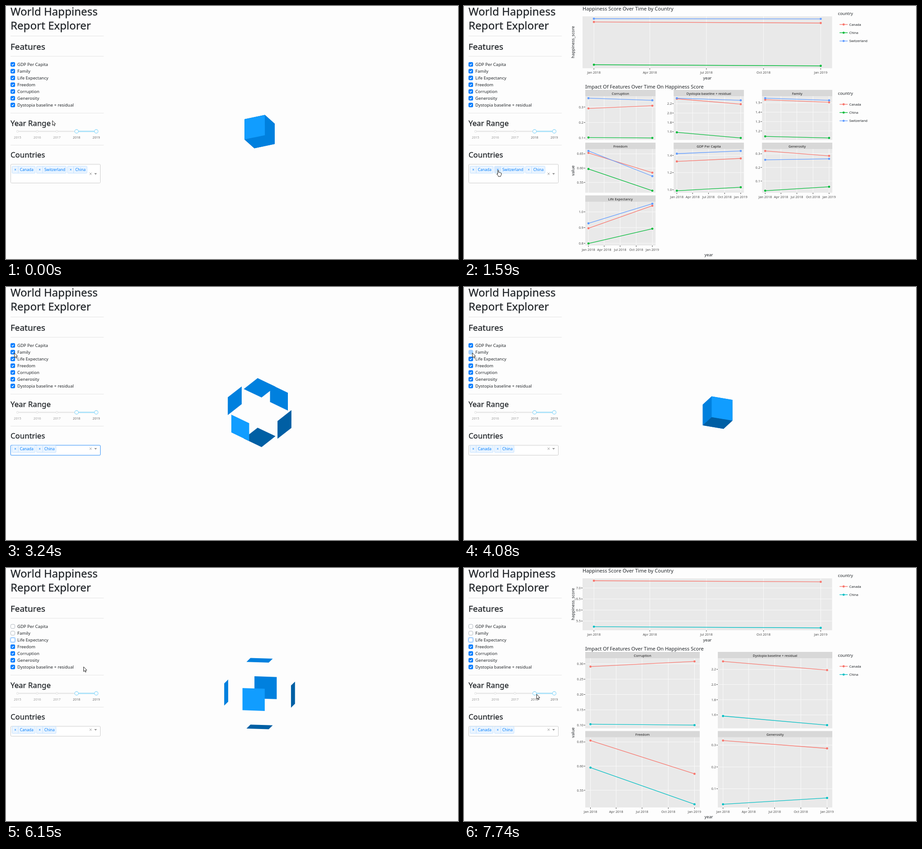
These frames come from a looping animation (999x561 px, 7990 ms). An HTML page with a canvas:

```html
<!DOCTYPE html>
<html lang="en">
<head>
<meta charset="utf-8">
<title>World Happiness Report Explorer</title>
<style>
html, body { margin: 0; width: 100%; height: 100%; overflow: hidden; background: #fdfdfd; }
canvas { display: block; width: 999px; height: 561px; }
</style>
</head>
<body>
<canvas id="stage" width="999" height="561"></canvas>
<script>
const ctx = document.getElementById('stage').getContext('2d');
const LOOP = 7990;
const FONT = '"Noto Sans", "Open Sans", sans-serif';
const BLUE = '#007bff', INK = '#212529', BG = '#fdfdfd';

const BEATS = [[0, 0], [1, 150], [8, 1050], [10, 1290], [17, 2280], [18, 2430], [24, 3240],
  [25, 3360], [26, 3510], [30, 4080], [33, 4500], [34, 4620], [41, 5550], [42, 5670],
  [46, 6150], [49, 6600], [50, 6720], [58, 7740]];
const times = [0];
for (let i = 1; i < BEATS.length; i++) {
  const [s0, t0] = BEATS[i - 1], [s1, t1] = BEATS[i];
  for (let s = s0 + 1; s <= s1; s++) times.push(Math.floor(t0 + (t1 - t0) * (s - s0) / (s1 - s0)));
}
const hold = t => times.filter(s => s <= t).pop();

const clamp = v => Math.max(0, Math.min(1, v));

// ---------- drawing helpers ----------
function text(str, x, y, size, { color = INK, align = 'left', weight = 400, bold = 0 } = {}) {
  ctx.font = `${weight} ${size}px ${FONT}`;
  ctx.textAlign = align;
  ctx.fillStyle = ctx.strokeStyle = color;
  ctx.fillText(str, x, y);
  if (bold) { ctx.lineWidth = bold; ctx.strokeText(str, x, y); }
}

function vtext(str, x, y, size) {
  ctx.save();
  ctx.translate(x, y);
  ctx.rotate(-Math.PI / 2);
  text(str, 0, 0, size, { align: 'center' });
  ctx.restore();
}

function rect(x, y, w, h, fill) {
  ctx.fillStyle = fill;
  ctx.fillRect(x, y, w, h);
}

function line(points, color, width = 1) {
  ctx.beginPath();
  points.forEach(([x, y]) => ctx.lineTo(x, y));
  ctx.strokeStyle = color;
  ctx.lineWidth = width;
  ctx.stroke();
}

function paint(fill, stroke, width = 1) {
  if (fill) { ctx.fillStyle = fill; ctx.fill(); }
  if (stroke) { ctx.strokeStyle = stroke; ctx.lineWidth = width; ctx.stroke(); }
}

function box(x, y, w, h, r, fill, stroke, width) {
  ctx.beginPath();
  ctx.roundRect(x, y, w, h, r);
  paint(fill, stroke, width);
}

function dot(x, y, r, fill, stroke, width) {
  ctx.beginPath();
  ctx.arc(x, y, r, 0, 7);
  paint(fill, stroke, width);
}

function poly(points, fill, stroke, width) {
  ctx.beginPath();
  points.forEach(([x, y]) => ctx.lineTo(x, y));
  ctx.closePath();
  paint(fill, stroke, width);
}

// ---------- sidebar ----------
const LABELS = ['GDP Per Capita', 'Family', 'Life Expectancy', 'Freedom', 'Corruption',
  'Generosity', 'Dystopia baseline + residual'];
const CLICKS = { 'Family': 4012, 'GDP Per Capita': 4800, 'Life Expectancy': 5300 };
const DROP = 2200, BLUR = 3950;

function checkbox(label, i, t) {
  const y = 124.5 + i * 15, off = t - CLICKS[label];
  const later = Object.values(CLICKS).some(c => c > CLICKS[label] && c <= t);
  if (off >= 0) {
    const focus = !later && off > 150;
    if (focus) box(8.5, y - 1.5, 13, 13, 4, '#bfdeff');
    const fresh = off < 150;
    box(10.5, y + .5, 9, 9, 2.5, fresh ? '#a5d2ff' : '#fff',
      fresh ? '#8fc5fb' : focus ? '#80bdff' : '#adb5bd', 1);
  } else {
    box(10, y, 10, 10, 2.5, BLUE);
    line([[12.7, y + 5.1], [14.3, y + 6.7], [17.4, y + 3.5]], '#fff', 1.4);
  }
  text(label, 25, y + 8.5, 9.5);
}

function slider() {
  const years = [25.5, 69, 112.5, 156, 199.5];
  rect(25, 276.7, 175, 2.6, '#e7e7e7');
  rect(156, 276.7, 43.5, 2.6, '#a6e1fa');
  years.forEach((x, i) => {
    const on = i > 2;
    if (on) dot(x, 278, 4, '#fff', '#96dbfa', 1.4);
    else dot(x, 278, 2.1, '#fff', '#e4e4e4', 1.1);
    text(2015 + i, x, 293.5, 7.2, { align: 'center', color: on ? '#666' : '#999' });
  });
}

function dropdown(t) {
  const short = t >= DROP, focus = short && t < BLUR;
  const mid = short ? 359 : 363, h = short ? 22 : 41.5;
  const tags = [['Canada', 51], ['Switzerland', 65.5], ['China', 43]].filter(([n]) => !short || n !== 'Switzerland');
  if (focus) box(9, 349.8, 200.5, h + 2.4, 3, '#d4e8ff');
  box(10.5, 351, 198, h, 2, '#fff', focus ? '#3f97f6' : '#ccc', 1);
  let x = 13.5;
  tags.forEach(([name, w], i) => {
    box(x, mid - 7.8, w, 15.6, 1.5, '#ebf5ff', '#c2e0ff', 1);
    if (i === 1 && t >= 1170 && t < 2430) rect(x + .5, mid - 7.3, 13, 14.6, '#d8eafd');
    line([[x + 13.5, mid - 7.8], [x + 13.5, mid + 7.8]], '#c2e0ff');
    text('×', x + 7, mid + 3, 8, { align: 'center', color: '#007eff' });
    text(name, x + 17.2, mid + 3.2, 8.5, { color: '#007eff' });
    x += w + 3;
  });
  if (focus && (t - 2250) % 1060 < 530) line([[114.5, 352.5], [114.5, 365.5]], '#222');
  const cy = short ? 358.5 : 372;
  line([[184.7, cy - 2.4], [189.3, cy + 2.4]], '#999');
  line([[184.7, cy + 2.4], [189.3, cy - 2.4]], '#999');
  poly([[195, cy - 1.3], [201, cy - 1.3], [198, cy + 1.9]], '#888');
}

function sidebar(t) {
  const head = (str, y, size) => text(str, 10, y, size, { weight: 500, bold: .3 });
  head('World Happiness', 21, 24.1);
  head('Report Explorer', 51.5, 24.1);
  head('Features', 97, 18.9);
  head('Year Range', 265.5, 16.8);
  head('Countries', 336, 16.8);
  [66, 111, 237, 308].forEach(y => rect(10, y, 206, 1, '#e4e4e4'));
  LABELS.forEach((label, i) => checkbox(label, i, t));
  slider();
  dropdown(t);
}

// ---------- loading cube ----------
// [start, degrees per ms, end]
const RUNS = [[-620.4, .3317, 51], [51, .3317, 1400], [2255, .327, 3600], [4010, .3317, 6850]];
const MID = '#0080de', DARK = '#005fa4';
// normal, two edge directions, colour
const FACES = [
  [[0, 0, 1], [1, 0, 0], [0, 1, 0], '#119dff'],
  [[0, 0, -1], [1, 0, 0], [0, 1, 0], MID],
  [[-1, 0, 0], [0, 0, 1], [0, 1, 0], MID],
  [[1, 0, 0], [0, 0, 1], [0, 1, 0], DARK],
  [[0, -1, 0], [1, 0, 0], [0, 0, 1], MID],
  [[0, 1, 0], [1, 0, 0], [0, 0, 1], DARK]
];

function cube(deg) {
  const a = deg * Math.PI / 180, c = Math.cos(a), s = Math.sin(a);
  const gap = 25 + 50 * clamp((deg - 240) / 92);
  const turn = ([x, y, z]) => {
    const u = x * c + z * s, w = z * c - x * s;
    return [u, y * c - w * s, y * s + w * c];
  };
  FACES.map(([n, p, q, color]) => ({ n: turn(n), p: turn(p), q: turn(q), color }))
    .sort((f, g) => f.n[2] - g.n[2])
    .forEach(({ n, p, q, color }) => {
      const at = (i, j) => [0, 1].map(k => [560.5, 278.5][k] + n[k] * gap + 25 * (p[k] * i + q[k] * j));
      poly([at(-1, -1), at(1, -1), at(1, 1), at(-1, 1)], color);
    });
}

// ---------- charts ----------
// each series: 2018 and 2019 values for Canada, China, Switzerland
const SCORE = [[7.328, 7.278], [5.246, 5.191], [7.487, 7.48]];
const DATA = {
  'Corruption': [[.291, .308], [.103, .1], [.357, .343]],
  'Dystopia baseline + residual': [[2.305, 2.19], [1.585, 1.465], [2.318, 2.272]],
  'Family': [[1.532, 1.505], [1.142, 1.125], [1.549, 1.526]],
  'Freedom': [[.653, .584], [.597, .521], [.66, .572]],
  'GDP Per Capita': [[1.33, 1.365], [.989, 1.029], [1.42, 1.452]],
  'Generosity': [[.321, .285], [.029, .058], [.256, .263]],
  'Life Expectancy': [[.896, 1.039], [.799, .893], [.927, 1.052]]
};
const NAMES = ['Canada', 'China', 'Switzerland'];
const HUES = { 2: ['#f8766d', '#00bfc4'], 3: ['#f8766d', '#00ba38', '#619cff'] };
const QUARTERS = [['Jan 2018', 0], ['Apr 2018', .2466], ['Jul 2018', .4959], ['Oct 2018', .7479], ['Jan 2019', 1]];
const TICK = '#4d4d4d', PAD = .0455;

function plot(x, y, w, h, series, hues, axis) {
  const all = series.flat(), lo = Math.min(...all), span = Math.max(...all) - lo;
  const px = f => x + w * (PAD + (1 - 2 * PAD) * f);
  const py = v => y + h * (1 - PAD - (1 - 2 * PAD) * (v - lo) / span);
  const step = [.02, .05, .1, .2, .5].find(s => span / s <= 4.3);
  rect(x, y, w, h, '#e9e9e9');
  for (let k = Math.ceil((lo - span * .05) / step); k * step < lo + span * 1.05; k++) {
    const ty = py(k * step);
    line([[x, ty], [x + w, ty]], '#fafafa');
    line([[x - 3, ty], [x, ty]], '#444');
    text((k * step).toFixed(step < .1 ? 2 : 1), x - 4, ty + 2.7, 7.3, { align: 'right', color: TICK });
  }
  QUARTERS.forEach(([label, f]) => {
    line([[px(f), y], [px(f), y + h]], '#fafafa');
    if (!axis) return;
    line([[px(f), y + h], [px(f), y + h + 3]], '#444');
    text(label, px(f), y + h + 12, 7.4, { align: 'center', color: TICK });
  });
  series.forEach((pair, i) => {
    const pts = pair.map((v, j) => [px(j), py(v)]);
    line(pts, hues[i], 1.3);
    pts.forEach(p => dot(...p, 2.4, hues[i]));
  });
}

function legend(y, hues) {
  text('country', 826.5, y + 3, 9.2);
  hues.forEach((hue, i) => {
    const ly = y + 24.5 + 18.3 * i;
    line([[830, ly], [848, ly]], hue, 1.3);
    dot(839, ly, 2.4, hue);
    text(NAMES[i], 851.5, ly + 2.7, 7.4);
  });
}

function charts(count, features) {
  const hues = HUES[count];
  text('Happiness Score Over Time by Country', 262, 10, 11);
  plot(262, 23, 551.5, 115, SCORE.slice(0, count), hues, true);
  text('year', 538, 163, 9.2, { align: 'center' });
  vtext('happiness_score', 244, 80, 9.2);
  legend(16.5, hues);

  text('Impact Of Features Over Time On Happiness Score', 268, 183, 11);
  const cols = features.length > 4 ? 3 : 2, gap = 40;
  const w = (546 - gap * (cols - 1)) / cols, stride = (345 + 6) / cols;
  features.forEach((name, i) => {
    const x = 268 + (i % cols) * (w + gap), y = 186 + Math.floor(i / cols) * stride;
    plot(x, y + 14, w, stride - 20, DATA[name].slice(0, count), hues, i + cols >= features.length);
    rect(x, y, w, 14, '#d8d8d8');
    text(name, x + w / 2, y + 10.8, 7.5, { align: 'center', color: '#1a1a1a' });
  });
  text('year', 541, 555, 9.2, { align: 'center' });
  vtext('value', 244, 365, 9.2);
  legend(193.5, hues);
}

// ---------- pointer ----------
const PATH = [[0, 102, 254], [150, 102, 254], [1050, 82, 212], [1170, 72, 357], [1500, 75, 364], [2430, 75, 365],
  [3120, 18, 146], [4300, 18, 146], [4800, 16, 130], [4950, 16, 130], [5250, 17, 160], [5350, 17, 160],
  [5550, 126, 200], [6000, 171, 219], [6720, 171, 219], [7500, 160, 280], [LOOP, 160, 280]];
const ARROW = [[0, 0], [0, 10.5], [2.4, 8.4], [4, 12], [5.6, 11.2], [4.1, 7.8], [7.2, 7.6]];
const HAND = [[-.9, .6], [0, 0], [1, .6], [1.2, 5], [3, 5], [5, 5.7], [7, 6.6], [7, 10], [5.6, 12.8], [5.4, 14],
  [.4, 14], [.2, 12.8], [-2.8, 9], [-2.4, 7.8], [-.9, 8.8]];

function pointer(t) {
  const i = PATH.findIndex(p => p[0] > t), [t0, x0, y0] = PATH[i - 1], [t1, x1, y1] = PATH[i];
  const f = (t - t0) / (t1 - t0), e = f * f * (3 - 2 * f);
  const x = x0 + (x1 - x0) * e, y = y0 + (y1 - y0) * e;
  const shape = t >= 1170 && t < 2560 ? HAND : ARROW;
  ctx.lineJoin = 'round';
  poly(shape.map(([dx, dy]) => [x + dx + .5, y + dy]), '#fff', '#222', 1);
  ctx.lineJoin = 'miter';
}

function draw(t) {
  rect(0, 0, 999, 561, BG);
  sidebar(t);
  const run = RUNS.find(([start, , end]) => t >= start && t < end);
  if (run) cube((t - run[0]) * run[1]);
  else charts(t < 2255 ? 3 : 2, Object.keys(DATA).filter(n => t < 4010 || !(n in CLICKS)));
  pointer(t);
}

const begin = performance.now();
function tick() {
  draw(hold((performance.now() - begin) % LOOP));
  requestAnimationFrame(tick);
}
tick();
</script>
</body>
</html>
```
